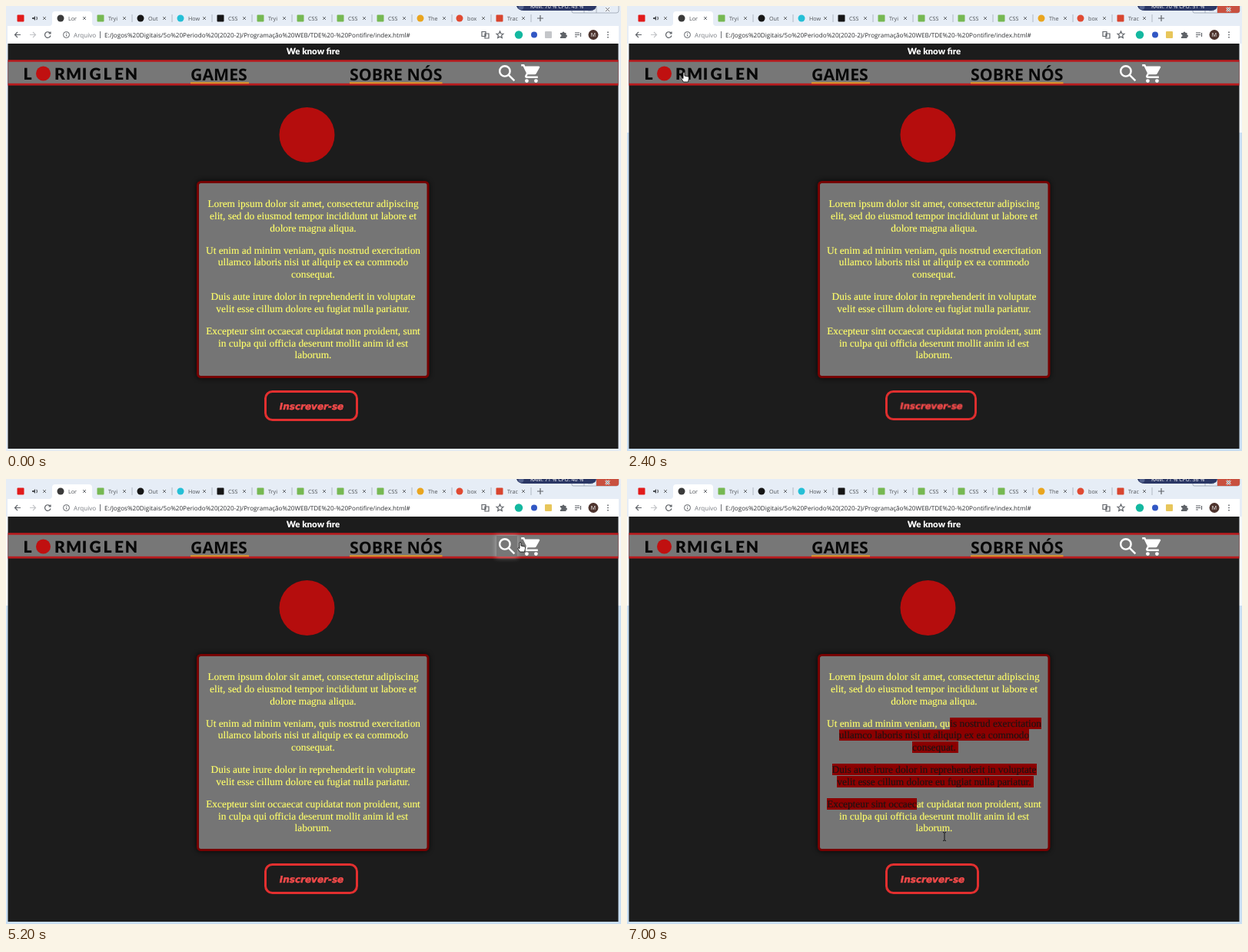
Write an HTML page that moves like this. It is 800 px wide and 580 px high and loops after 7100 ms.

```html
<!DOCTYPE html>
<html lang="pt-BR">
<head>
<meta charset="utf-8">
<title>Lormiglen</title>
<style>
html, body { margin: 0; width: 100%; height: 100%; overflow: hidden; background: #e6edf6; }
#stage { position: absolute; left: 0; top: 0; width: 800px; height: 580px; overflow: hidden; text-rendering: geometricPrecision; }
svg { position: absolute; left: 0; top: 0; }
.ui { font-family: "Open Sans", "Noto Sans", sans-serif; }
.line { fill: none; stroke: #5f6368; stroke-width: 1.2; }
.menu { font: 700 21.3px "Open Sans", sans-serif; fill: #080808; }

.copy {
  position: absolute; inset: 0; box-sizing: border-box; padding: 250.2px 1px 0 0;
  font: 13.36px/15.7px "Liberation Serif", "Times New Roman", serif;
  text-align: center; color: #ffff6a; -webkit-text-stroke: .15px;
}
.copy p { margin: 0 0 13.36px; }
#picked { color: #1d1414; animation-name: pick; }
#picked span { background: #8b0000; box-shadow: 3px 0 #8b0000; }

/* every animation shares one clock */
#picked, #active, #mail, #join, #status, #glow, #meter, #mouse, #arrow, #hand, #beam {
  animation-duration: 7100ms; animation-iteration-count: infinite;
  animation-timing-function: step-end;
}
#active { animation-name: wake; }
@keyframes wake { 0% { opacity: 0 } 19.71%, 100% { opacity: 1 } }
#mail { animation-name: mail; }
@keyframes mail { 0% { fill: #c4c6c9 } 26.76%, 100% { fill: #e8c65a } }
#join { transform-origin: 336px 501px; animation-name: join; }
@keyframes join { 0%, 36.61%, 100% { transform: none } 25.35% { transform: scale(.975) } }
#status { animation-name: status; }
@keyframes status {
  0%, 90.14%, 100% { opacity: 0 } 76.05% { opacity: 1 }
  85.91% { opacity: .75 } 87.32% { opacity: .5 } 88.73% { opacity: .25 }
}
#glow { animation-name: glow; }
@keyframes glow { 0%, 74.64%, 100% { opacity: 0 } 69.01% { opacity: 1 } }
#meter { animation-name: meter; }
@keyframes meter {
  0% { transform: none } 14.08% { transform: translateY(-10px) }
  47.88% { transform: translateY(-20px) } 66.19% { transform: translateY(-30px) }
  80.28% { transform: translateY(-40px) } 94.36%, 100% { transform: translateY(-50px) }
}

#mouse { animation-name: mouse; animation-timing-function: linear; }
@keyframes mouse {
  0% { transform: translate(820px, 590px); animation-timing-function: step-end }
  1.4% { transform: translate(600px, 545px); animation-timing-function: steps(7) }
  11.26% { transform: translate(110px, 60px); animation-timing-function: steps(5) }
  18.3%, 25.35% { transform: translate(51px, 40px); animation-timing-function: steps(4) }
  30.98% { transform: translate(72px, 86px); animation-timing-function: steps(2) }
  33.8%, 36.61% { transform: translate(74px, 86px); animation-timing-function: steps(4) }
  42.25% { transform: translate(262px, 88px); animation-timing-function: steps(3) }
  46.47% { transform: translate(290px, 90px); animation-timing-function: steps(6) }
  54.92% { transform: translate(455px, 92px); animation-timing-function: steps(3) }
  59.15% { transform: translate(475px, 94px); animation-timing-function: steps(3) }
  63.38% { transform: translate(500px, 92px); animation-timing-function: steps(4) }
  69.01% { transform: translate(650px, 86px); animation-timing-function: steps(3) }
  73.23% { transform: translate(669px, 82px); animation-timing-function: steps(2) }
  76.05%, 80.28% { transform: translate(682px, 86px); animation-timing-function: steps(5) }
  87.32% { transform: translate(428px, 323px); animation-timing-function: steps(3) }
  91.54% { transform: translate(420px, 318px); animation-timing-function: steps(5) }
  98.59%, 100% { transform: translate(413px, 466px) }
}
#arrow { animation-name: arrow; }
@keyframes arrow {
  0%, 40.84%, 47.88%, 66.19%, 81.69% { opacity: 1 }
  30.98%, 42.25%, 54.92%, 69.01%, 85.91%, 100% { opacity: 0 }
}
#hand { animation-name: hand; }
@keyframes hand {
  0%, 40.84%, 47.88%, 66.19%, 81.69%, 100% { opacity: 0 }
  30.98%, 42.25%, 54.92%, 69.01% { opacity: 1 }
}
#beam { animation-name: beam; }
@keyframes beam { 0% { opacity: 0 } 85.91%, 100% { opacity: 1 } }

@keyframes pick {
  0% { clip-path: polygon(0 0, 0 0, 0 0) }
  92.95% { clip-path: polygon(420px 310px, 434px 310px, 434px 326.4px, 420px 326.4px) }
  94.36% { clip-path: polygon(420px 310px, 545px 310px, 545px 326.4px, 418px 326.4px, 418px 342px, 255px 342px, 255px 326.4px, 420px 326.4px) }
  95.77% { clip-path: polygon(420px 310px, 545px 310px, 545px 342px, 410px 342px, 410px 358px, 255px 358px, 255px 326.4px, 420px 326.4px) }
  97.18% { clip-path: polygon(420px 310px, 545px 310px, 545px 387px, 392px 387px, 392px 403px, 255px 403px, 255px 326.4px, 420px 326.4px) }
  98.59%, 100% { clip-path: polygon(420px 310px, 545px 310px, 545px 415px, 377px 415px, 377px 432px, 255px 432px, 255px 326.4px, 420px 326.4px) }
}
</style>
</head>
<body>
<div id="stage">
<svg width="800" height="580" viewBox="0 0 800 580">
  <defs>
    <clipPath id="meterBox"><rect x="664" width="104" height="6"/></clipPath>
    <filter id="soft" x="-50%" y="-50%" width="200%" height="200%"><feGaussianBlur stdDeviation="3"/></filter>
  </defs>

  <!-- window frame -->
  <rect width="800" height="580" fill="#e6edf6"/>
  <g fill="none" stroke="#9aa3b0" stroke-width=".8">
    <path d="M736 0V7Q736 9 738 9H794Q797 9 797 6V0M752 0V9M768 0V9"/>
    <path d="M741 5h6M757 2h6v4h-6z"/>
  </g>
  <g id="active">
    <path d="M0 49H3V165H0ZM796 49h4v116h-4Z" fill="#f4f8fd"/>
    <path d="M0 165H3V580H0ZM796 165h4v415h-4ZM0 576H800v4H0Z" fill="#c9def3"/>
    <path d="M768 0H797V6Q797 9 794 9H768Z" fill="#c8503f"/>
  </g>
  <path d="M780 2l5 5M785 2l-5 5" stroke="#fff" stroke-width="2.4"/>
  <path d="M780 2l5 5M785 2l-5 5" stroke="#555b66" stroke-width=".9"/>
  <path d="M664 0H768Q767 6 760 6H674Q666 6 664 0Z" fill="#2b3765"/>
  <circle cx="670" cy="1" r="3.5" fill="#55648f"/>
  <g clip-path="url(#meterBox)"><g id="meter" class="ui" font-size="7" fill="#fff"></g></g>

  <!-- tabs and toolbar -->
  <path d="M56 26Q60 26 60 22V11Q60 7 64 7H108Q112 7 112 11V22Q112 26 116 26Z" fill="#fff"/>
  <rect x="2" y="26" width="795" height="23" fill="#fff"/>
  <g id="tabs" class="ui" font-size="7.2" fill="#4b4f54"></g>
  <path d="M34 15h2l2-2v6l-2-2h-2z" fill="#4b4f54"/>
  <path d="M39.5 14q2 2 0 4" class="line" stroke-width=".8"/>
  <path d="M691 16h8M695 12v8" class="line"/>
  <g class="line">
    <path d="M19 37.5h-7.5M15 34l-3.5 3.5 3.5 3.5"/>
    <path d="M31 37.5h7.5M35 34l3.5 3.5-3.5 3.5" stroke="#c3c5c8"/>
    <path d="M57.5 35.5a3.8 3.8 0 1 0 .5 3M58 33.5v2.5h-2.5"/>
    <circle cx="78.5" cy="37.5" r="4" stroke-width="1"/>
    <path d="M78.5 37v2.5M78.5 35v1M122.5 33v9" stroke-width=".9"/>
  </g>
  <g class="ui" font-size="8.12">
    <text x="88" y="40.5" fill="#777b80">Arquivo</text>
    <text x="128" y="40.5" fill="#2b2d30">E:/Jogos%20Digitais/5o%20Periodo%20(2020-2)/Programação%20WEB/TDE%20-%20Pontifire/index.html#</text>
  </g>
  <g class="line" stroke-width=".9">
    <path d="M619 33.5h5v6h-5zM623 36h5v6h-5z"/>
    <path d="M642.5 33l1.3 3 3.2.3-2.4 2.1.7 3.2-2.8-1.7-2.8 1.7.7-3.2-2.4-2.1 3.2-.3z"/>
    <path d="M740 35h6M740 37.5h6M740 40h3M747.5 35v5"/>
  </g>
  <circle cx="667" cy="37.5" r="5.2" fill="#14b8a0"/>
  <circle cx="687" cy="37.5" r="4" fill="#3157c4"/>
  <rect id="mail" x="701" y="33" width="9" height="9" rx="1"/>
  <path d="M721 35h2.5a1.5 1.5 0 0 1 3 0h2v2.5a1.5 1.5 0 0 1 0 3V42h-7.5v-2a1.5 1.5 0 0 0 0-3z" fill="#5f6368"/>
  <circle cx="764" cy="37.5" r="6.5" fill="#4e342e"/>
  <text x="764" y="40" class="ui" font-size="7" fill="#fff" text-anchor="middle">M</text>
  <path d="M783 33.5v1.6M783 36.7v1.6M783 39.9v1.6" stroke="#5f6368" stroke-width="1.6"/>

  <!-- page -->
  <rect x="2.5" y="49" width="794" height="528" fill="#1c1c1c"/>
  <text x="399.5" y="63" text-anchor="middle" fill="#fff" font-family="Lato, sans-serif" font-weight="900" font-size="11.5">We know fire</text>
  <rect x="2.5" y="70.2" width="794" height="33.4" fill="#b91c1f"/>
  <rect x="2.5" y="72.8" width="794" height="28" fill="#777"/>
  <text x="28 70 88 102 116 132 147 163" y="96" text-anchor="middle" fill="#080808" font-family="Lato, sans-serif" font-weight="900" font-size="21">LRMIGLEN</text>
  <circle cx="48.5" cy="88" r="9.5" fill="#c01010"/>
  <path d="M240 100.2h76M447 100.2h120.5" stroke="#e0962a" stroke-width="2"/>
  <text x="240" y="96.5" class="menu">GAMES</text>
  <text x="447" y="96.5" class="menu">SOBRE NÓS</text>
  <g id="glow">
    <rect x="637" y="73" width="29" height="30" fill="#fff" opacity=".35" filter="url(#soft)"/>
    <rect x="638" y="74" width="27" height="27" fill="#777"/>
  </g>
  <g transform="translate(637.3 73.3) scale(1.22)" fill="none" stroke="#fff" stroke-width="2">
    <circle cx="9.5" cy="9.5" r="5.5"/><path d="M13.5 13.5l6.2 6.2"/>
  </g>
  <g transform="translate(669 73.6) scale(1.2)" fill="#fff">
    <path d="M1 2h3.27l.94 2H20a1 1 0 0 1 .87 1.5l-3.58 6.47Q16.8 13 15.55 13H8.1l-.9 1.63q0 .37.22.37H19v2H7q-2.7-.3-1.75-2.96L6.6 11.59 3 4H1z"/>
    <circle cx="7" cy="20" r="2"/><circle cx="17" cy="20" r="2"/>
  </g>
  <circle cx="391.5" cy="168" r="36" fill="#b50d0d"/>

  <rect x="247" y="227" width="304" height="259" rx="7" fill="#000" opacity=".6" filter="url(#soft)"/>
  <rect x="249.5" y="229.5" width="299.5" height="254" rx="4" fill="#757575" stroke="#760000" stroke-width="3"/>

  <g id="join">
    <rect x="337.5" y="502.5" width="119" height="37" rx="9" fill="none" stroke="#e22f2f" stroke-width="3"/>
    <text x="397.5" y="525.5" text-anchor="middle" fill="#f24a4a" stroke="#f24a4a" stroke-width=".5" font-family="'DejaVu Sans', sans-serif" font-weight="700" font-style="italic" font-size="12">Inscrever-se</text>
  </g>

  <g id="status" class="ui">
    <path d="M2 564H263Q266 564 266 567V577H2Z" fill="#dee1e6"/>
    <text x="6" y="573.5" font-size="6.95" fill="#3c4043">E:/Jogos Digitais/5o Periodo (2020-2)/Programação WEB/.../index.html</text>
  </g>
</svg>

<div class="copy" id="copy">
  <p><span>Lorem ipsum dolor sit amet, consectetur adipiscing<br>elit, sed do eiusmod tempor incididunt ut labore et<br>dolore magna aliqua.</span></p>
  <p><span>Ut enim ad minim veniam, quis nostrud exercitation<br>ullamco laboris nisi ut aliquip ex ea commodo<br>consequat.</span></p>
  <p><span>Duis aute irure dolor in reprehenderit in voluptate<br>velit esse cillum dolore eu fugiat nulla pariatur.</span></p>
  <p><span>Excepteur sint occaecat cupidatat non proident, sunt<br>in culpa qui officia deserunt mollit anim id est<br>laborum.</span></p>
</div>

<svg id="pointer" width="800" height="580" viewBox="0 0 800 580">
  <g id="mouse" stroke-linejoin="round">
    <path id="arrow" d="M0 0V10.5L2.5 8.2 4.2 12 6 11.2 4.3 7.6H7.5Z" fill="#fff" stroke="#000" stroke-width=".8"/>
    <path id="hand" d="M-1 1Q0-.5 1 1V5L5.5 6Q7 6.5 6.5 8.5L5.5 13H-.5L-3.5 8.5Q-3.5 7-1 8.5Z" fill="#fff" stroke="#000" stroke-width=".8"/>
    <path id="beam" d="M-2-5.5Q0-5.5 0-4.5Q0-5.5 2-5.5M0-4.5V4.5M-2 5.5Q0 5.5 0 4.5Q0 5.5 2 5.5" fill="none" stroke="#151515"/>
  </g>
</svg>
</div>

<script>
const byId = id => document.getElementById(id);
const green = "#76b852";
// favicon centre, colour, title, round?
const tabs = [
  [19, "#e21b1b", ""], [71, "#3a3a3a", "Lor", true], [123, green, "Tryi"],
  [175, "#161616", "Out", true], [227, "#25bfd6", "How", true], [279, "#161616", "CSS"],
  [331, green, "Tryi"], [383, green, "CSS"], [435, green, "CSS"], [487, green, "CSS"],
  [539, "#e9a51f", "The", true], [590, "#e04a32", "box", true], [642, "#d8452f", "Trac"]
];
byId("tabs").innerHTML = tabs.map(([x, color, title, round], i) => {
  const end = x + 31;
  const divider = i > 1 ? `<path d="M${x + 41} 11v10" stroke="#a3abb6" stroke-width=".8"/>` : "";
  return `<rect x="${x - 4.5}" y="11.5" width="9" height="9" rx="${round ? 4.5 : 1}" fill="${color}"/>
    <text x="${x + 10}" y="19">${title}</text>
    <path d="M${end - 2} 14l4 4m0-4l-4 4" stroke="#5f6368" stroke-width=".9"/>${divider}`;
}).join("");

const loads = [[70, 45], [70, 51], [71, 49], [71, 40], [71, 42], [71, 36]];
byId("meter").innerHTML = loads.map(([ram, cpu], i) =>
  `<text x="682" y="${3 + i * 10}">RAM: ${ram} % CPU: ${cpu} %</text>`).join("");

const picked = byId("copy").cloneNode(true);
picked.id = "picked";
picked.setAttribute("aria-hidden", "true");
byId("pointer").before(picked);
</script>
</body>
</html>
```
